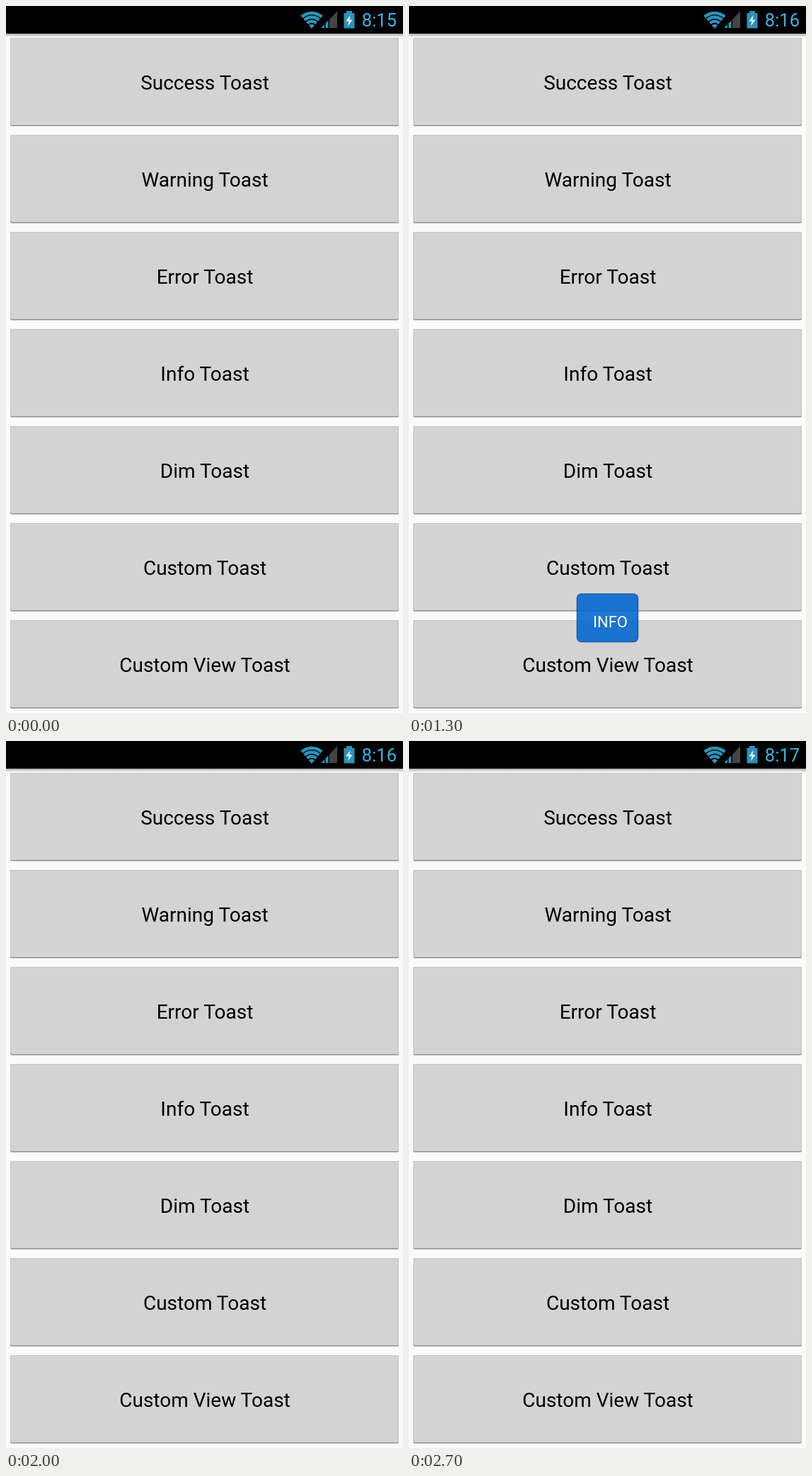
Recreate the animation shown at these times as an HTML page. Size 561 by 998 pixels, loop 4 s.

```html
<!DOCTYPE html>
<html lang="en">
<head>
<meta charset="utf-8">
<title>Toast demo</title>
<style>
  html, body { margin: 0; width: 100%; height: 100%; overflow: hidden; background: #fafafa; }
  svg { display: block; width: 561px; height: 998px; font-family: Roboto, "Open Sans", sans-serif; }
  .label { font-size: 28px; text-anchor: middle; }
  .clock { font-size: 25.5px; text-anchor: end; fill: #33b5e5; }
  .note { font-size: 22px; text-anchor: middle; fill: #fff; }

  /* 2.5% of the loop is 100 ms */
  .timed { opacity: 0; animation: 4s step-end infinite; }
  #time15 { animation-name: time15; }
  #time16 { animation-name: time16; }
  #time17 { animation-name: time17; }
  #success { animation-name: success; }
  #warning { animation-name: warning; }
  #error { animation-name: error; }
  #info { animation-name: info; }
  #dim { animation-name: dim; }
  #custom { animation-name: custom; }
  #view { animation-name: view; }

  @keyframes time15 { 0% { opacity: 1 } 2.5%, 100% { opacity: 0 } }
  @keyframes time16 { 0% { opacity: 0 } 2.5% { opacity: 1 } 67.5%, 100% { opacity: 0 } }
  @keyframes time17 { 0% { opacity: 0 } 67.5%, 100% { opacity: 1 } }
  @keyframes success { 0% { opacity: 0 } 5% { opacity: 1 } 10%, 100% { opacity: 0 } }
  @keyframes warning { 0% { opacity: 0 } 15% { opacity: 1 } 17.5%, 100% { opacity: 0 } }
  @keyframes error { 0% { opacity: 0 } 22.5% { opacity: 1 } 27.5%, 100% { opacity: 0 } }
  @keyframes info { 0% { opacity: 0 } 30% { opacity: .93 } 32.5% { opacity: .9 } 35%, 100% { opacity: 0 } }
  @keyframes dim { 0% { opacity: 0 } 37.5% { opacity: 1 } 42.5%, 100% { opacity: 0 } }
  @keyframes custom {
    0% { opacity: 0; transform: none }
    45% { opacity: .35; transform: translateX(-22.5px) }
    47.5% { opacity: 1; transform: none }
    50%, 100% { opacity: 0; transform: none }
  }
  @keyframes view { 0% { opacity: 0 } 55% { opacity: .93 } 57.5%, 100% { opacity: 0 } }
</style>
</head>
<body>
<svg viewBox="0 0 561 998">
  <defs>
    <linearGradient id="barShade" x2="0" y2="1">
      <stop stop-color="#a8a8a8"/><stop offset="1" stop-color="#fafafa"/>
    </linearGradient>
    <radialGradient id="blueHalf" gradientUnits="userSpaceOnUse" cx="280.5" cy="470" r="176">
      <stop offset=".72" stop-color="#457bc7"/><stop offset=".9" stop-color="#5593cb"/>
      <stop offset="1" stop-color="#74bad9"/>
    </radialGradient>
    <radialGradient id="yellowHalf" gradientUnits="userSpaceOnUse" cx="280.5" cy="510" r="182">
      <stop offset=".6" stop-color="#f8dc20"/><stop offset=".79" stop-color="#fff22c"/>
      <stop offset="1" stop-color="#f3eda0"/>
    </radialGradient>
    <linearGradient id="gloss" x2="0" y2="1">
      <stop stop-color="#fff" stop-opacity=".58"/><stop offset=".5" stop-color="#fff" stop-opacity=".3"/>
      <stop offset="1" stop-color="#fff" stop-opacity="0"/>
    </linearGradient>
    <linearGradient id="glow" x2="0" y2="1">
      <stop stop-color="#fff" stop-opacity=".18"/><stop offset="1" stop-color="#fff" stop-opacity=".48"/>
    </linearGradient>
    <radialGradient id="ballShade">
      <stop offset=".92" stop-color="#00264f" stop-opacity=".5"/>
      <stop offset="1" stop-color="#00264f" stop-opacity="0"/>
    </radialGradient>
    <clipPath id="fan"><path d="M432 32 409 5h46z"/></clipPath>
    <clipPath id="ball"><circle cx="280.5" cy="524" r="167"/></clipPath>
  </defs>

  <rect width="561" height="998" fill="#fafafa"/>
  <rect y="39" width="561" height="5" fill="url(#barShade)"/>
  <rect width="561" height="39" fill="#000"/>

  <g fill="#2d92b9">
    <g clip-path="url(#fan)">
      <circle cx="432" cy="31" r="5.5"/>
      <g fill="none" stroke="#2d92b9" stroke-width="4.4">
        <circle cx="432" cy="31" r="9.4"/>
        <circle cx="432" cy="31" r="15.2"/>
        <circle cx="432" cy="31" r="21"/>
      </g>
    </g>
    <path d="M446 31v-1l4-4v5zM451.500 31v-6.500l4-4V31z"/>
    <path d="M457 31V19L468 7.500V31z" fill="#454545"/>
    <path d="M481 7h8v3h3.500v21.500h-15V10h3.500z"/>
    <path d="M486.500 13l-6 8.500h4l-1.500 7 6.500-9h-4z" fill="#e8f6fb"/>
  </g>
  <g class="clock">
    <text id="time15" class="timed" x="552" y="29">8:15</text>
    <text id="time16" class="timed" x="552" y="29">8:16</text>
    <text id="time17" class="timed" x="552" y="29">8:17</text>
  </g>

  <g id="buttons"></g>
  <g id="notes"></g>

  <g id="custom" class="timed">
    <rect x="34.500" y="473.500" width="492" height="89.500" rx="6" fill="#ff0"/>
    <rect x="46.500" y="506" width="25" height="25" fill="#a52a2a"/>
    <text x="281" y="537" font-size="37.300" text-anchor="middle" fill="#00f">Custom toast</text>
    <path transform="translate(489.300 498.800) scale(1.560)" fill="#8a2be2" d="M12 2C6.480 2 2 6.480 2 12s4.480 10 10 10 10-4.480 10-10S17.520 2 12 2zm-1 17.930c-3.950-.490-7-3.850-7-7.930 0-.620.080-1.210.210-1.790L9 15v1c0 1.100.9 2 2 2v1.930zm6.900-2.540c-.260-.810-1-1.390-1.900-1.390h-1v-3c0-.550-.450-1-1-1H8v-2h2c.550 0 1-.450 1-1V7h2c1.100 0 2-.9 2-2v-.410c2.930 1.190 5 4.060 5 7.410 0 2.080-.8 3.970-2.100 5.390z"/>
  </g>

  <g id="view" class="timed">
    <rect x="31.500" y="150.500" width="498" height="747" rx="6" fill="#0369cf" stroke="#0450a0"/>
    <circle cx="280.500" cy="526" r="181" fill="url(#ballShade)"/>
    <g clip-path="url(#ball)">
      <rect x="113" y="356" width="335" height="168" fill="url(#blueHalf)"/>
      <rect x="113" y="524" width="335" height="168" fill="url(#yellowHalf)"/>
      <path d="M113 630Q280.500 678 448 630V692H113z" fill="url(#glow)"/>
    </g>
    <ellipse cx="280.500" cy="450" rx="120.500" ry="91" fill="url(#gloss)"/>
    <circle cx="280.500" cy="524" r="167" fill="none" stroke="#56708a" stroke-width="2"/>
  </g>
</svg>
<script>
  const kinds = ["Success", "Warning", "Error", "Info", "Dim", "Custom", "Custom View"];
  document.getElementById("buttons").innerHTML = kinds.map((kind, i) => `
    <g transform="translate(0 ${137 * i})">
      <rect x="6" y="45" width="549" height="124.5" rx="2" fill="#8e8e8e"/>
      <rect x="6" y="45" width="549" height="123" rx="2" fill="#c4c4c4"/>
      <rect x="7" y="46" width="547" height="122" rx="1" fill="#d3d3d3"/>
      <text class="label" x="281" y="118">${kind} Toast</text>
    </g>`).join("");

  // label, box width, fill, border
  const notes = [
    ["success", 134, "#0b8043", "#07562d"],
    ["warning", 136, "#b08500", "#6e2b0a"],
    ["error", 107, "#c62828", "#7f1010"],
    ["info", 86, "#0769d0", "#0450a0"],
    ["dim", 80, "#696969", "#444"]
  ];
  document.getElementById("notes").innerHTML = notes.map(([name, width, fill, border]) => `
    <g id="${name}" class="timed">
      <rect x="${280.5 - width / 2}" y="830" width="${width}" height="67.500" rx="6"
        fill="${fill}" stroke="${border}" stroke-width="1.500"/>
      <text class="note" x="284.500" y="876.500">${name.toUpperCase()}</text>
    </g>`).join("");
</script>
</body>
</html>
```
